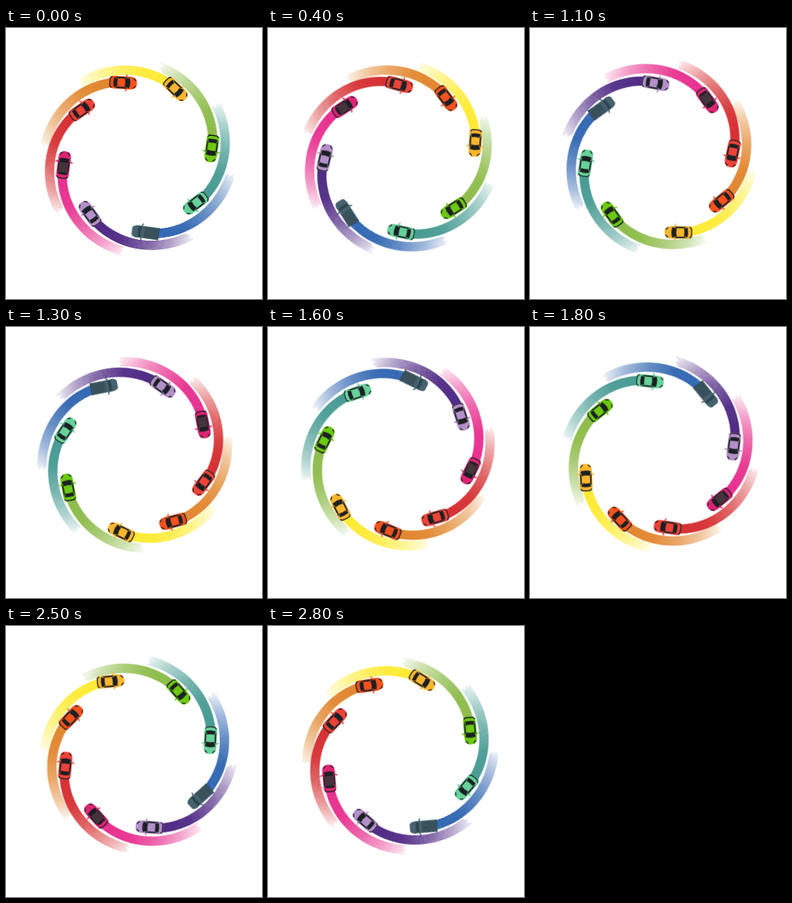
These frames come from a looping animation (320 px wide and 339 px high, 2900 ms). An HTML page:

```html
<!DOCTYPE html>
<html lang="en">
<head>
<meta charset="utf-8">
<title>Ring of cars</title>
<style>
  html, body { margin: 0; width: 100%; height: 100%; overflow: hidden; background: #fff; }
  svg { display: block; width: 100vw; height: 100vh; }
  #ring { transform-origin: 0 0; animation: turn 2900ms steps(29) infinite; }
  @keyframes turn { to { transform: rotate(360deg); } }
</style>
</head>
<body>
<svg viewBox="0 0 320 339">
  <defs id="defs"></defs>
  <g transform="translate(163.2 161)"><g id="ring"></g></g>
</svg>
<script>
const NS = 'http://www.w3.org/2000/svg';
const defs = document.getElementById('defs');
const ring = document.getElementById('ring');

// angle and radius of the car, sweep and end radius of its trail
const cars = [
  { a: -100.3, r: 94.1, sweep: 73, end: 115.5, trail: '#e18228', body: '#f4511e' },
  { a: -59.8, r: 97.3, sweep: 68, end: 116, trail: '#fdea2e', body: '#fbb62d' },
  { a: -6.2, r: 94.4, sweep: 69, end: 116, trail: '#8aba45', body: '#6cc810' },
  { a: 38.5, r: 94, sweep: 72, end: 119, trail: '#439890', body: '#66d29a' },
  { a: 83.6, r: 95.2, sweep: 73, end: 119.5, trail: '#2b62af', body: '#46616e', kind: 'pickup' },
  { a: 129.6, r: 92.1, sweep: 74, end: 120, trail: '#4a2481', body: '#b48fc8' },
  { a: 173.5, r: 91.7, sweep: 75.5, end: 119.5, trail: '#e62a8b', body: '#dc2472', kind: 'open' },
  { a: 221, r: 90, sweep: 76.5, end: 118, trail: '#d42a2d', body: '#ee4237' }
];

function add(parent, tag, attrs) {
  const el = document.createElementNS(NS, tag);
  for (const k in attrs) el.setAttribute(k, attrs[k]);
  return parent.appendChild(el);
}

function polar(deg, r) {
  const t = deg * Math.PI / 180;
  return [r * Math.cos(t), r * Math.sin(t)];
}

function fade(hex, white) {
  const n = parseInt(hex.slice(1), 16);
  const mix = s => Math.round((n >> s & 255) * (1 - white) + 255 * white);
  return `rgb(${mix(16)},${mix(8)},${mix(0)})`;
}

function drawTrail(car, i) {
  const start = car.r + 0.8;
  // drifts outwards, a little faster at first
  const radius = u => start + (car.end - start) * (u + 0.25 * u * (1 - u));
  const [x1, y1] = polar(car.a, start);
  const [x2, y2] = polar(car.a - car.sweep, car.end);
  const grad = add(defs, 'linearGradient', { id: 'fade' + i, gradientUnits: 'userSpaceOnUse', x1, y1, x2, y2 });
  for (const [offset, white] of [[0, 0], [.35, .06], [.6, .28], [.82, .56], [1, .88]])
    add(grad, 'stop', { offset, 'stop-color': fade(car.trail, white) });

  const strands = 6, gap = 1.9;
  for (let s = 0; s < strands; s++) {
    const shift = (s - (strands - 1) / 2) * gap;
    const stop = 1 - (s * 5 + i) % 3 * 0.012;
    const pts = [];
    for (let k = 0; k <= 30; k++) {
      const u = stop * k / 30;
      pts.push(polar(car.a - car.sweep * u, radius(u) + shift).map(v => v.toFixed(2)).join());
    }
    add(ring, 'polyline', { points: pts.join(' '), fill: 'none', stroke: `url(#fade${i})`, 'stroke-width': 2.3 });
  }
}

function drawCar({ a, r, body, kind }) {
  const g = add(ring, 'g', { transform: `rotate(${a}) translate(${r}) rotate(104)` });
  const shape = (d, fill) => add(g, 'path', { d, fill });
  const dark = '#1b2024';
  add(g, 'path', { d: 'M5 -7L3.5 -10.2M5 7L3.5 10.2', stroke: body, 'stroke-width': 1.5, 'stroke-linecap': 'round' });

  if (kind === 'pickup') {
    shape('M-17 -7.6H10Q16 -7 16.6 -4V4Q16 7 10 7.6H-17Z', body);
    shape('M-16 -6.3H1V6.3H-16Z', '#39515b');
    shape('M5 -6L8.5 -6.6Q10 0 8.5 6.6L5 6Q6.3 0 5 -6Z', '#2c444e');
    shape('M-17.4 -7.9H-16.4V7.9H-17.4Z', '#30474f');
    return;
  }
  shape('M-17 -5Q-16.5 -7.7 -12 -7.9H9Q15.8 -7.6 17 -3Q17.6 0 17 3Q15.8 7.6 9 7.9H-12Q-16.5 7.7 -17 5Q-17.6 0 -17 -5Z', body);
  shape('M2 -5L7.8 -6.6Q10 0 7.8 6.6L2 5Q3.4 0 2 -5Z', dark);
  shape('M-7 -4.8L-11.5 -6.2Q-13 0 -11.5 6.2L-7 4.8Q-7.8 0 -7 -4.8Z', dark);
  shape('M-10.5 -7L5.5 -7.2L2 -5.3H-7ZM-10.5 7L5.5 7.2L2 5.3H-7Z', dark);
  if (kind === 'open') shape('M-9 -5.2H3V5.2H-9Z', '#44343c');
  add(g, 'path', {
    d: 'M-14 -7L-16.3 -5Q-16.9 0 -16.3 5L-14 7M12.8 -6.4L16 -3.2M12.8 6.4L16 3.2',
    fill: 'none', stroke: dark, 'stroke-width': 1.3
  });
}

cars.forEach(drawTrail);
cars.forEach(drawCar);
</script>
</body>
</html>
```
